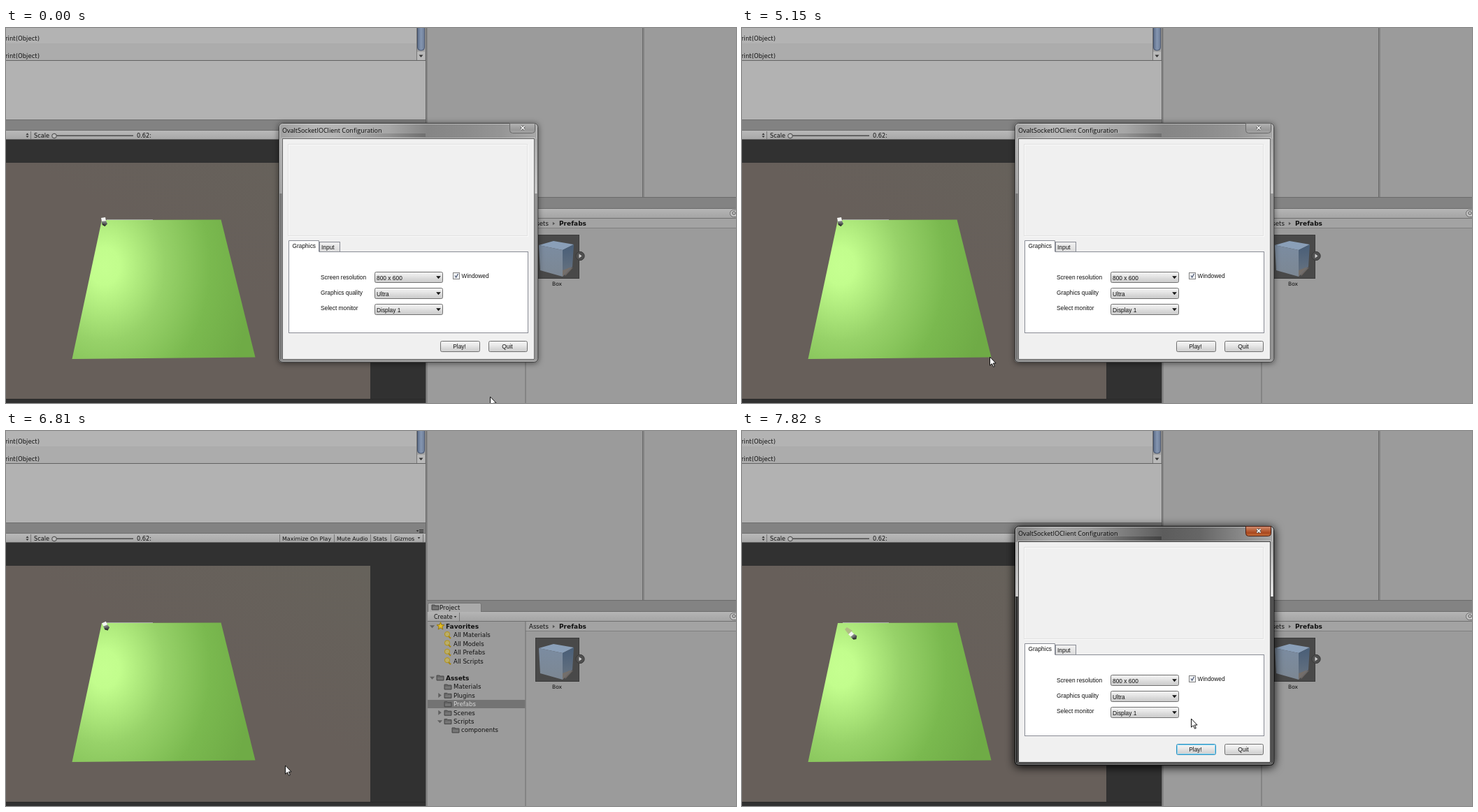
Write an HTML page with a canvas that moves like this. It is 1044 px wide and 537 px high and loops after 8000 ms.

```html
<!DOCTYPE html>
<html lang="en">
<head>
<meta charset="utf-8">
<title>Box scene</title>
<style>
  html, body { margin: 0; width: 100%; height: 100%; overflow: hidden; background: #9b9b9b; }
  canvas { display: block; }
</style>
</head>
<body>
<canvas id="stage" width="1044" height="537"></canvas>
<script>
const canvas = document.getElementById('stage');
const c = canvas.getContext('2d');
const LOOP = 8000, CLOSED = 6290, REOPENED = 7610;
const EDITOR = '"DejaVu Sans", sans-serif';
const FORM = '"Liberation Sans", sans-serif';

function rect(x, y, w, h, fill) {
  c.fillStyle = fill;
  c.fillRect(x, y, w, h);
}

function frame(x, y, w, h, stroke) {
  c.strokeStyle = stroke;
  c.lineWidth = 1;
  c.strokeRect(x + .5, y + .5, w - 1, h - 1);
}

function text(s, x, y, font, fill = '#111', align = 'left') {
  c.font = font;
  c.fillStyle = fill;
  c.textAlign = align;
  c.fillText(s, x, y);
}

function label(s, x, y, size = 8.6, fill = '#111') {
  text(s, x, y, size + 'px ' + EDITOR, fill);
}

function bold(s, x, y, size = 9) {
  text(s, x, y, 'bold ' + size + 'px ' + EDITOR);
}

function form(s, x, y, align) {
  text(s, x, y, '8.4px ' + FORM, '#111', align);
}

function linear(x0, y0, x1, y1, ...colors) {
  const g = c.createLinearGradient(x0, y0, x1, y1);
  colors.forEach((color, i) => g.addColorStop(i / (colors.length - 1), color));
  return g;
}

const vertical = (y, h, ...colors) => linear(0, y, 0, y + h, ...colors);

function poly(points, fill, stroke) {
  c.beginPath();
  for (let i = 0; i < points.length; i += 2) c.lineTo(points[i], points[i + 1]);
  c.closePath();
  paint(fill, stroke);
}

function round(x, y, w, h, r, fill, stroke) {
  c.beginPath();
  c.roundRect(x, y, w, h, r);
  paint(fill, stroke);
}

function disc(x, y, r, fill, stroke) {
  c.beginPath();
  c.arc(x, y, r, 0, 2 * Math.PI);
  paint(fill, stroke);
}

function paint(fill, stroke) {
  if (fill) { c.fillStyle = fill; c.fill(); }
  if (stroke) { c.strokeStyle = stroke; c.lineWidth = 1; c.stroke(); }
}

const down = (x, y, r, fill) => poly([x - r, y - r / 2, x + r, y - r / 2, x, y + r / 2 + .5], fill);
const right = (x, y, r, fill) => poly([x - r / 2, y - r, x + r / 2 + 1, y, x - r / 2, y + r], fill);

function drawConsole() {
  rect(0, 0, 600, 22, '#b3b3b3');
  rect(0, 22, 600, 25, '#acacac');
  rect(0, 47, 600, 84, '#b2b2b2');
  rect(0, 46, 600, 1, '#626262');
  text('print(Object)', 48, 18, '8.5px ' + EDITOR, '#111', 'right');
  text('print(Object)', 48, 43, '8.5px ' + EDITOR, '#111', 'right');
  rect(587, 0, 13, 46, '#a2a2a2');
  rect(587, 0, 1, 46, '#777');
  round(588.5, -8, 10, 40, 4, linear(588, 0, 599, 0, '#596a86', '#8495b0', '#6d7d97'), '#45526a');
  rect(588, 34, 11, 12, '#b9b9b9');
  down(593.5, 40, 3, '#333');
}

function drawGameBar() {
  rect(0, 131, 600, 16, '#828282');
  rect(0, 131, 600, 1, '#6d6d6d');
  rect(0, 147, 600, 13, vertical(147, 13, '#b9b9b9', '#a6a6a6'));
  rect(0, 146, 600, 1, '#707070');
  rect(0, 159, 600, 1, '#666');
  poly([28.5, 153, 30.5, 150.5, 32.5, 153], '#333');
  poly([28.5, 154.5, 30.5, 157, 32.5, 154.5], '#333');
  rect(35, 148, 1, 11, '#777');
  label('Scale', 40, 157, 8.2);
  rect(69, 153.5, 113, 1.5, '#4c4c4c');
  disc(69, 154.5, 3.3, '#bbb', '#444');
  label('0.62:', 187, 157, 8.2);
  for (const x of [391, 469, 521, 550, 596]) rect(x, 148, 1, 11, '#767676');
  label('Maximize On Play', 395, 157, 7.9);
  label('Mute Audio', 473, 157, 7.9);
  label('Stats', 525, 157, 7.9);
  label('Gizmos', 555, 157, 7.9);
  down(590.5, 153, 1.8, '#333');
  for (const y of [141, 143, 145]) rect(591, y, 6, 1, '#333');
  down(588.5, 143, 1.8, '#333');
}

function drawScene() {
  rect(0, 160, 600, 377, '#313131');
  rect(0, 193, 521, 338, linear(380, 400, 500, 193, '#675f5a', '#66625b'));
  rect(0, 531, 600, 1, '#292929');

  c.save();
  c.beginPath();
  c.moveTo(137, 275);
  c.lineTo(307.5, 274.5);
  c.lineTo(356.5, 471.5);
  c.lineTo(94.5, 474);
  c.clip();
  c.translate(141, 341);
  c.scale(1, 1.25);
  const light = c.createRadialGradient(0, 0, 0, 0, 0, 215);
  light.addColorStop(0, '#c5ff90');
  light.addColorStop(.1, '#c2fd8d');
  light.addColorStop(.4, '#97d269');
  light.addColorStop(.7, '#7ab94f');
  light.addColorStop(1, '#6fab46');
  rect(-60, -70, 290, 190, light);
  c.restore();
  rect(144, 274, 66, 1, '#a9aca8');
}

function drawCube(x, y, angle) {
  c.save();
  c.translate(x, y);
  c.rotate(angle);
  poly([-3.5, -.8, 3, -1.6, 5, 3, 1.5, 6.5, -2, 4.6], vertical(-1, 7, '#8d9191', '#292c29'));
  poly([-2.8, 2, 1, 4, 1.5, 6.5, -2, 4.6], '#333');
  poly([-4, -5.5, 2, -6.5, 3, -1.6, -3, -.8], '#f2f4f2');
  c.restore();
}

function folder(x, y) {
  poly([x, y - 3, x + 4, y - 3, x + 5, y - 2, x + 10, y - 2, x + 10, y + 4, x, y + 4], '#686868', '#484848');
  rect(x + 1, y, 8, 3, '#777');
}

function lens(x, y) {
  disc(x, y - 1, 3.6, '#b9ad6b', '#b59313');
  c.strokeStyle = '#a98608';
  c.lineWidth = 2;
  c.beginPath();
  c.moveTo(x + 2, y + 2);
  c.lineTo(x + 5, y + 5);
  c.stroke();
}

function star(x, y) {
  const pts = [];
  for (let i = 0; i < 10; i++) {
    const r = i % 2 ? 2.5 : 5.7, a = i * Math.PI / 5 - Math.PI / 2;
    pts.push(x + r * Math.cos(a), y + r * Math.sin(a));
  }
  poly(pts, '#e3bb20', '#927616');
}

function drawProject() {
  rect(600, 0, 444, 537, '#9b9b9b');
  rect(600, 0, 3, 537, '#858585');
  rect(600, 0, 1, 537, '#656565');
  rect(910, 0, 3, 243, '#858585');
  rect(910, 0, 1, 243, '#696969');
  rect(602, 242, 442, 17, '#838383');
  rect(602, 242, 442, 1, '#6b6b6b');
  round(603.5, 246.5, 76, 15, [2, 2, 0, 0], '#aaa', '#737373');
  rect(603, 259, 441, 13, vertical(259, 13, '#b5b5b5', '#a4a4a4'));
  rect(603, 272, 441, 1, '#707070');
  rect(679, 258, 365, 1, '#6c6c6c');
  folder(609, 252);
  label('Project', 620, 256);
  label('Create', 612, 269, 8);
  down(642.5, 266, 1.8, '#333');
  rect(648, 260, 1, 12, '#777');
  round(1035.5, 260.5, 30, 10, 5, '#c3c3c3', '#696969');
  disc(1041, 265, 2.2, null, '#555');

  rect(743, 273, 301, 13, '#a3a3a3');
  rect(743, 286, 301, 1, '#808080');
  rect(742.5, 273, 1, 264, '#6f6f6f');
  label('Assets', 748, 283);
  right(783, 280, 2.2, '#555');
  bold('Prefabs', 791, 283);

  down(609.5, 280, 3.6, '#606060');
  star(621.5, 279.5);
  bold('Favorites', 629, 283);
  ['Materials', 'Models', 'Prefabs', 'Scripts'].forEach((name, i) => {
    const y = 292 + i * 12.4;
    lens(631, y);
    label('All ' + name, 640, y + 3.3);
  });

  down(609.5, 353.5, 3.6, '#606060');
  folder(616, 353);
  bold('Assets', 629, 357);
  rect(603, 385, 139.5, 12, '#737373');
  ['Materials', 'Plugins', 'Prefabs', 'Scenes', 'Scripts'].forEach((name, i) => {
    const y = 366 + i * 12.4;
    folder(627, y);
    label(name, 640, y + 3.3, 8.6, i === 2 ? '#d8d8d8' : '#111');
    if (i === 1 || i === 3) right(620, y, 3.5, '#606060');
  });
  down(620.5, 416, 3.6, '#606060');
  folder(638, 428);
  label('components', 651, 431.3);

  rect(757, 296, 63, 63, '#494949');
  frame(757, 296, 63, 63, '#3b3b3b');
  poly([796, 346, 811, 343, 800, 355], '#6d6661');
  poly([762, 311, 783, 305, 812, 310, 796, 318], '#8a9fb8');
  poly([762, 311, 796, 318, 796, 356, 764, 347], linear(0, 310, 0, 356, '#7b8ca1', '#7c8793'));
  poly([796, 318, 812, 310, 810, 342, 796, 356], linear(800, 313, 804, 352, '#4a5f78', '#667280'));
  poly([796, 347, 809, 342, 796, 356], '#746e6a');
  disc(821, 326.5, 6.2, '#505050', '#3a3a3a');
  right(821, 326.5, 3, '#d0d0d0');
  text('Box', 788, 369, '7.6px ' + EDITOR, '#111', 'center');
}

function button(s, x, y, w, active) {
  round(x + .5, y + .5, w - 1, 15, 2, vertical(y, 16, '#f4f4f4', '#ececec', '#dadada', '#cecece'), active ? '#2f8fbd' : '#707070');
  if (active) round(x + 1.5, y + 1.5, w - 3, 13, 1, null, '#7fd3f3');
  form(s, x + w / 2 - 1, y + 11, 'center');
}

function combo(name, value, y) {
  form(name, 450, y + 11 - (y - 349) / 23 * 1.2);
  round(527.5, y + .5, 97, 15, 2, vertical(y, 16, '#f3f3f3', '#e9e9e9', '#d7d7d7', '#cbcbcb'), '#707070');
  form(value, 530, y + 11.5);
  down(618.5, y + 8, 3.3, '#111');
}

function drawGlass(active) {
  c.save();
  c.shadowColor = active ? '#000' : 'rgba(0,0,0,.55)';
  c.shadowBlur = active ? 14 : 8;
  c.shadowOffsetY = active ? 2 : 1;
  round(390, 136, 371, 343, 5, '#777');
  c.restore();

  c.save();
  c.beginPath();
  c.roundRect(390, 136, 371, 343, 5);
  c.clip();
  const tones = active
    ? ['#858585', '#a6a6a6', '#9c9c9c', '#7c7c7c', '#5c5c5c', '#666', '#858585', '#aaa']
    : ['#a0a0a0', '#b7b7b7', '#b2b2b2', '#a6a6a6', '#858585', '#8b8b8b', '#959595', '#aaa'];
  rect(390, 136, 371, 23, linear(390, 0, 761, 0, ...tones));
  rect(470, 151, 130, 5, linear(470, 0, 600, 0, 'rgba(40,40,40,0)', active ? 'rgba(35,35,35,.45)' : 'rgba(60,60,60,.3)'));
  rect(390, 159, 6, 78, vertical(159, 78, '#aaa', active ? '#c5c5c5' : '#999'));
  rect(390, 237, 6, 242, active ? '#202020' : '#6b6b6b');
  rect(756, 159, 5, 78, vertical(159, 78, '#a0a0a0', active ? '#e0e0e0' : '#c0c0c0'));
  rect(756, 237, 5, 242, active ? '#3a3a3a' : '#858585');
  rect(390, 474, 371, 5, linear(390, 0, 761, 0, active ? '#2b2b2b' : '#777', active ? '#444' : '#8c8c8c'));
  c.restore();
  round(391.5, 137.5, 368, 340, 4, null, 'rgba(255,255,255,.4)');
  round(390.5, 136.5, 370, 342, 5, null, active ? '#111' : '#404040');
  frame(394, 157, 363, 319, 'rgba(255,255,255,.35)');
}

function drawDialog(active) {
  drawGlass(active);
  text('OvaltSocketIOClient Configuration', 395, 150, '9px "Open Sans", sans-serif', '#080808');

  const close = active
    ? vertical(136, 15, '#d3927a', '#bf6b45', '#a8461d', '#cf7a42')
    : vertical(136, 15, '#b5b5b5', '#a6a6a6', '#989898', '#a8a8a8');
  round(720.5, 136.5, 36, 14, [0, 0, 4, 4], close, active ? '#491e13' : '#696969');
  for (const [color, width] of [['#555', 3.2], ['#fff', 1.6]]) {
    c.strokeStyle = color;
    c.lineWidth = width;
    c.beginPath();
    c.moveTo(736.5, 140.5); c.lineTo(741.5, 145.5);
    c.moveTo(741.5, 140.5); c.lineTo(736.5, 145.5);
    c.stroke();
  }

  rect(395, 158, 361, 317, '#f0f0f0');
  frame(395, 158, 361, 317, active ? '#363636' : '#5c5c5c');
  frame(404, 167, 343, 132, '#fafafa');
  frame(403, 166, 343, 132, '#e1e1e1');

  rect(404, 320, 343, 117, '#fff');
  frame(404, 320, 343, 117, '#898c95');
  rect(448, 306, 30, 14, vertical(306, 14, '#f2f2f2', '#dcdcdc'));
  frame(448, 306, 30, 15, '#898c95');
  rect(404, 304, 44, 18, '#fff');
  c.strokeStyle = '#898c95';
  c.beginPath();
  c.moveTo(404.5, 322); c.lineTo(404.5, 304.5); c.lineTo(447.5, 304.5); c.lineTo(447.5, 320.5);
  c.stroke();
  form('Graphics', 409.5, 315);
  form('Input', 451, 316.5);

  combo('Screen resolution', '800 x 600', 349);
  combo('Graphics quality', 'Ultra', 372);
  combo('Select monitor', 'Display 1', 395);

  rect(639, 350, 10, 10, '#f3f5f7');
  frame(639, 350, 10, 10, '#808080');
  c.strokeStyle = '#47536f';
  c.lineWidth = 1.2;
  c.beginPath();
  c.moveTo(642, 354.5); c.lineTo(643.7, 357); c.lineTo(646.5, 352);
  c.stroke();
  form('Windowed', 651.5, 358.3);

  button('Play!', 621, 448, 57, active);
  button('Quit', 690, 448, 56, false);
}

function drawCursor(x, y) {
  c.save();
  c.translate(x + .5, y);
  poly([0, 0, 0, 12.2, 2.9, 9.7, 5, 14.3, 6.8, 13.5, 4.8, 9, 8.6, 9], '#fff', '#111');
  c.restore();
}

// Progress of a move made of n equal jumps, the first one at start.
function jumps(t, start, end, n) {
  const k = Math.floor((t - start) / (end - start) * (n - 1) + 1e-6) + 1;
  return Math.max(0, Math.min(n, k)) / n;
}

const mix = (a, b, p) => a + (b - a) * p;

// Latest entry whose time has come.
const latest = (keys, t) => keys.filter(k => k[0] <= t).pop();

const cursorHolds = [
  [820, 358, 475], [920, 356, 472], [1200, 359, 469], [1305, 363, 465],
  [1410, 355, 472], [5150, 354, 471], [5340, 352, 468], [7400, 516, 505],
  [REOPENED, 610, 420], [7820, 642, 412]
];

const cubeHolds = [
  [7150, 149, 285], [7400, 152, 288], [REOPENED, 155.5, 290.5], [7820, 158.5, 293.5]
];

function cursorAt(t) {
  if (t < 820) {
    const p = jumps(t, 70, 820, 10), e = p * p * (3 - 2 * p);
    return [Math.round(mix(692, 358, e)), Math.round(mix(528, 475, e))];
  }
  if (t >= 6377 && t < 7400) {
    const p = jumps(t, 6377, 6990, 8);
    return [Math.round(mix(352, 427, p)), Math.round(mix(468, 485, p))];
  }
  return latest(cursorHolds, t).slice(1);
}

function cubeAt(t) {
  if (t >= 7150) return [...latest(cubeHolds, t).slice(1), -.6];
  const p = jumps(t, 6720, 6990, 4);
  return [mix(140, 145, p), mix(277.5, 281.5, p), -.5 * p];
}

function draw(t) {
  drawConsole();
  drawGameBar();
  drawScene();
  if (t >= REOPENED) poly([147, 284, 150, 281, 158, 286, 153, 292], '#b0bd83');
  drawCube(...cubeAt(t));
  drawProject();
  if (t < CLOSED || t >= REOPENED) drawDialog(t >= REOPENED);
  drawCursor(...cursorAt(t));
}

const began = performance.now();
function tick() {
  draw((performance.now() - began) % LOOP);
  requestAnimationFrame(tick);
}
tick();
</script>
</body>
</html>
```
